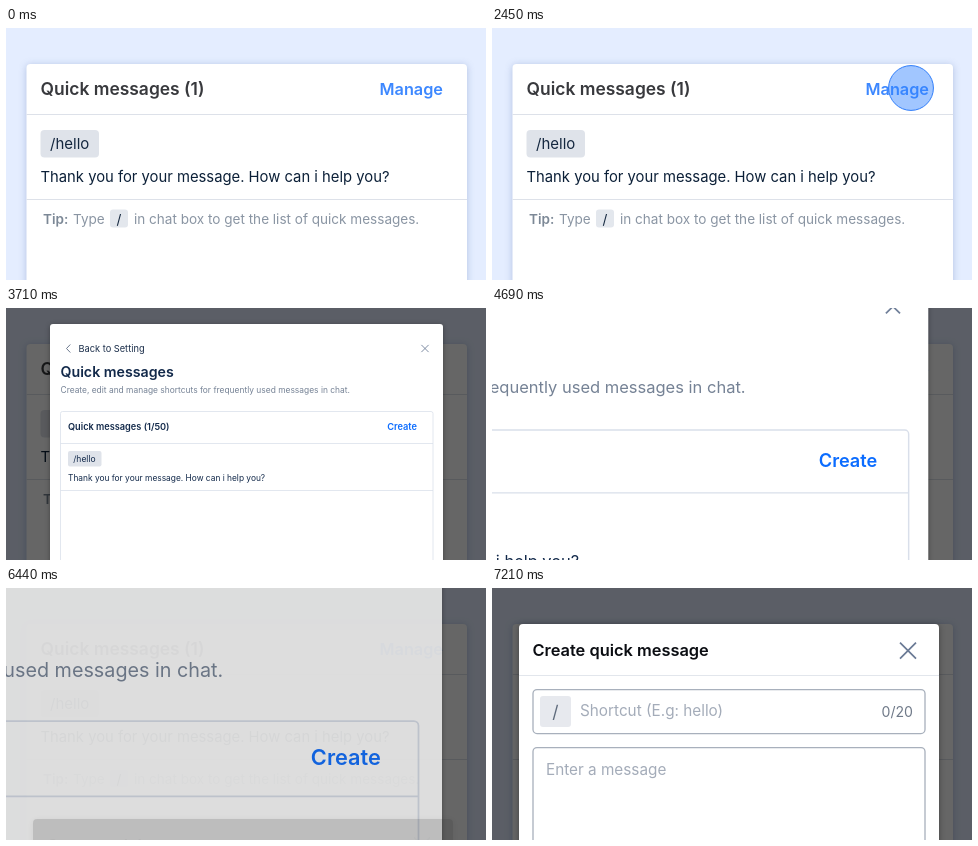
An HTML page with a canvas that plays this animation: 480x252 px, repeating every 8 s.

```html
<!DOCTYPE html>
<html lang="en">
<head>
<meta charset="utf-8">
<title>Quick messages</title>
<style>
html, body { margin: 0; width: 100%; height: 100%; overflow: hidden; background: #e4edff; }
canvas { display: block; width: 100vw; height: 100vh; }
</style>
</head>
<body>
<canvas id="stage"></canvas>
<script>
const W = 480, H = 252, LOOP = 8000;
const stage = document.getElementById('stage');
const main = stage.getContext('2d');
const buffer = document.createElement('canvas');
const group = buffer.getContext('2d');
let c = main;

const clamp = v => Math.min(1, Math.max(0, v));
const span = (t, start, length) => clamp((t - start) / length);
const outQuad = p => 1 - (1 - p) ** 2;
const inOut = p => p < .5 ? 4 * p ** 3 : 1 - (2 - 2 * p) ** 3 / 2;
const mix = (a, b, p) => a + (b - a) * p;

function resize() {
  const dpr = window.devicePixelRatio || 1;
  for (const ctx of [main, group]) {
    const { canvas } = ctx;
    canvas.width = Math.round(innerWidth * dpr);
    canvas.height = Math.round(innerHeight * dpr);
    ctx.setTransform(canvas.width / W, 0, 0, canvas.height / H, 0, 0);
  }
}

function text(str, x, y, size, color, weight = 400, align = 'left') {
  c.font = `${weight} ${size}px Inter, sans-serif`;
  c.textAlign = align;
  c.fillStyle = color;
  c.fillText(str, x, y);
}

function box(x, y, w, h, r, fill, stroke, line = 1) {
  c.beginPath();
  c.roundRect(x, y, w, h, r);
  if (fill) { c.fillStyle = fill; c.fill(); }
  if (stroke) { c.strokeStyle = stroke; c.lineWidth = line; c.stroke(); }
}

function panel(x, y, w, h, r, shadow, blur) {
  c.save();
  c.shadowColor = shadow;
  c.shadowBlur = blur;
  c.shadowOffsetY = 1;
  box(x, y, w, h, r, '#fff');
  c.restore();
}

function lines(color, width, ...paths) {
  c.strokeStyle = color;
  c.lineWidth = width;
  c.beginPath();
  for (const [first, ...rest] of paths) {
    c.moveTo(...first);
    rest.forEach(p => c.lineTo(...p));
  }
  c.stroke();
}

const rule = (x1, x2, y, color, width = 1) => lines(color, width, [[x1, y], [x2, y]]);
const cross = (x, y, r, color, width) =>
  lines(color, width, [[x - r, y - r], [x + r, y + r]], [[x + r, y - r], [x - r, y + r]]);

// Paints a group off screen, then blends it in as a whole, darker while it is faint.
function layer(alpha, draw) {
  if (alpha <= 0) return;
  group.clearRect(0, 0, W, H);
  c = group;
  c.save();
  draw();
  c.restore();
  c.globalCompositeOperation = 'source-atop';
  c.fillStyle = `rgba(0,0,0,${1 - alpha})`;
  c.fillRect(0, 0, W, H);
  c.globalCompositeOperation = 'source-over';
  c = main;
  c.globalAlpha = alpha;
  c.drawImage(buffer, 0, 0, W, H);
  c.globalAlpha = 1;
}

function page() {
  c.fillStyle = '#e4edff';
  c.fillRect(0, 0, W, H);
  panel(20.5, 36, 440.5, 260, 4, 'rgba(80,110,170,.35)', 7);
  text('Quick messages (1)', 34.5, 67.3, 17.45, '#38393d', 600);
  text('Manage', 437, 67.3, 16.3, '#3d88ff', 600, 'right');
  rule(20.5, 461, 86.5, '#dde1e9');
  box(34.5, 102, 58.5, 27.5, 4, '#dfe3ea');
  text('/hello', 44, 121.3, 15, '#14273f');
  text('Thank you for your message. How can i help you?', 34.5, 153.6, 14.8, '#0c2038');
  rule(20.5, 461, 171.5, '#dde1e9');
  text('Tip:', 37, 196, 13.55, '#7c8896', 600);
  text('Type', 67, 196, 13.55, '#8a95a3');
  box(104, 181.5, 18, 18, 3, '#e3e7ed');
  text('/', 113, 196, 13.55, '#14273f', 400, 'center');
  text('in chat box to get the list of quick messages.', 128, 196, 13.55, '#8a95a3');
}

function settings() {
  const ink = '#12294a', edge = '#d9dfea';
  panel(44, 16, 393, 300, 3, 'rgba(0,0,0,.35)', 5);
  lines('#5d6b83', .9, [[64.3, 36.5], [60.5, 40.5], [64.3, 44.5]]);
  text('Back to Setting', 72.5, 43.9, 9.25, '#1b2e4a');
  cross(419, 40.5, 3.6, '#71809a', .9);
  text('Quick messages', 54.5, 69.2, 14.2, ink, 600);
  text('Create, edit and manage shortcuts for frequently used messages in chat.', 54.5, 84.8, 8.41, '#758295');
  box(54.5, 103.5, 372.5, 260, 2, null, edge, .75);
  text('Quick messages (1/50)', 62, 122.2, 9.2, ink, 600);
  text('Create', 411, 122.3, 9.25, '#0b6cff', 600, 'right');
  rule(54.5, 427, 135.5, edge, .75);
  box(62, 143, 33.5, 15.5, 2, '#dfe3ea');
  text('/hello', 67.3, 154, 8.5, ink);
  text('Thank you for your message. How can i help you?', 62, 173.1, 8.37, ink);
  rule(54.5, 427, 182.5, edge, .75);
}

function createForm() {
  const border = '#a8b0bc', hint = '#a4acb9';
  panel(27, 36, 420, 300, 4, 'rgba(0,0,0,.35)', 6);
  text('Create quick message', 40.5, 67.9, 16.4, '#0b0d12', 600);
  cross(416, 62.5, 8, '#6a7a95', 1.7);
  rule(27, 447, 87.5, '#e2e6ec');
  box(41, 101.5, 392, 44, 4, null, border, 1.3);
  box(48, 108, 31, 31, 3, '#e7e9ee');
  text('/', 63.5, 130, 17.5, '#5f6b7c', 400, 'center');
  text('Shortcut (E.g: hello)', 88, 128.3, 15.3, hint);
  text('0/20', 421, 129, 14.1, '#707a89', 400, 'right');
  box(41, 159.5, 392, 160, 4, null, border, 1.3);
  text('Enter a message', 54, 187, 15.3, hint);
}

function pointer(x, y, scale, alpha) {
  if (alpha <= 0) return;
  c.globalAlpha = alpha;
  c.beginPath();
  c.arc(x, y, 23.5 * scale, 0, 7);
  c.fillStyle = 'rgba(48,128,255,.45)';
  c.fill();
  c.strokeStyle = '#2f7dfa';
  c.lineWidth = 1;
  c.stroke();
  c.globalAlpha = 1;
}

const press = (t, start, length, depth) => 1 - depth * Math.sin(Math.PI * span(t, start, length));

function draw(t) {
  c = main;
  page();

  c.fillStyle = `rgba(0,0,0,${.6 * outQuad(span(t, 3010, 630))})`;
  c.fillRect(0, 0, W, H);

  const rise = outQuad(span(t, 3010, 690));
  const zoom = inOut(span(t, 4200, 840));
  const leave = span(t, 6125, 805) ** 2.6;
  layer(outQuad(span(t, 3010, 455)) * (1 - leave), () => {
    c.translate(0, 236 * (1 - rise) + 40 * leave);
    const s = mix(1, 2.35, zoom);
    c.translate(mix(437, 436, zoom), 84.2);
    c.scale(s, s);
    c.translate(-437, -84.2);
    settings();
  });

  const enter = outQuad(span(t, 6400, 820));
  layer(outQuad(span(t, 6400, 455)), () => {
    c.translate(0, 216 * (1 - enter));
    createForm();
  });

  pointer(419, mix(228, 60, inOut(span(t, 1470, 770))),
    press(t, 2400, 260, .08) * mix(.7, 1, outQuad(span(t, 930, 330))),
    span(t, 930, 330) - span(t, 2660, 210));
  pointer(334.7, mix(228, 162, outQuad(span(t, 5110, 490))),
    press(t, 5640, 200, .05),
    span(t, 5110, 210) - span(t, 5870, 170));
}

function tick() {
  draw(performance.now() % LOOP);
  requestAnimationFrame(tick);
}

addEventListener('resize', resize);
resize();
tick();
</script>
</body>
</html>
```
